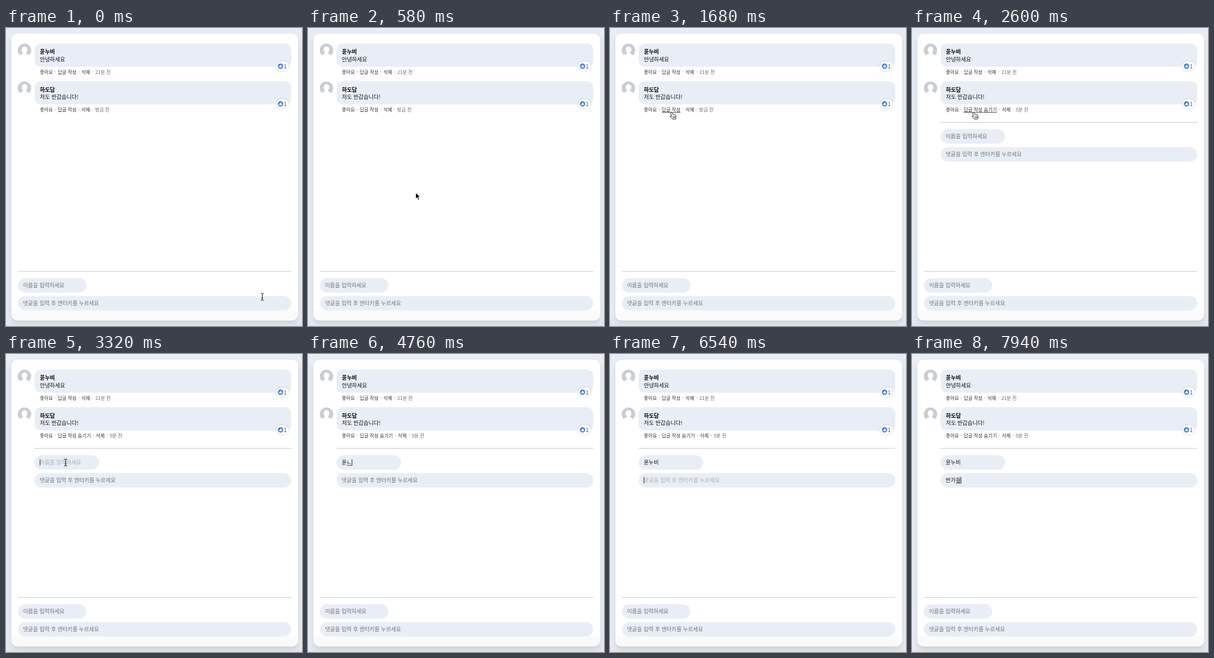
These frames come from a looping animation (496x500 px, 8000 ms). An HTML page:

```html
<!DOCTYPE html>
<html lang="ko">
<head>
<meta charset="utf-8">
<style>
html, body { margin: 0; width: 100%; height: 100%; overflow: hidden; background: #e9eef6; }
svg { display: block; }
text { font: 9.1px "Noto Sans CJK KR", "Noto Sans CJK", sans-serif; fill: #111; }
.name { font-size: 9.2px; font-weight: 700; fill: #000; }
.body { font-size: 9.2px; }
.link { font-size: 7.95px; font-weight: 500; fill: #333; }
.time { font-size: 7.95px; fill: #666; }
.hint { fill: #707378; }
.hint.focus { fill: #a9adb2; }
.count { font-size: 9.5px; fill: #50545a; }
.card { filter: drop-shadow(0 4px 5px rgba(0,0,0,.13)); }
.badge { filter: drop-shadow(0 .5px 1px rgba(0,0,0,.25)); }
.box { fill: #e9eef6; }
.rule { fill: #c9cacc; }
</style>
</head>
<body>
<svg id="stage" width="496" height="500" viewBox="0 0 496 500"></svg>
<script>
const rect = (cls, x, y, w, h, r = 0) => `<rect class="${cls}" x="${x}" y="${y}" width="${w}" height="${h}" rx="${r}"/>`;
const label = (cls, x, y, s, id = '') => `<text class="${cls}" x="${x}" y="${y}" ${id && `id="${id}"`}>${s}</text>`;
const NAME_HINT = '이름을 입력하세요', TEXT_HINT = '댓글을 입력 후 엔터키를 누르세요';

const avatar = y => `<g transform="translate(31 ${y})" clip-path="url(#disc)">
  <circle r="11.4" fill="#c9cdd2"/>
  <path fill="#fff" d="M0-6.5C3.4-6.5 4.9-4 4.7-1C4.5 1.2 3.6 2.6 2.6 3.5V5.3C5 6.5 8 7 8.5 12H-8.5C-8 7-5 6.5-2.6 5.3V3.5C-3.6 2.6-4.5 1.2-4.7-1C-4.9-4-3.4-6.5 0-6.5Z"/></g>`;

const comment = (y, name, body, links) => avatar(y + 11.5) +
  rect('box', 48, y, 430, 39, 10) +
  label('name', 56.7, y + 17.3, name) + label('body', 56.7, y + 29.7, body) +
  `<rect class="badge" x="453" y="${y + 30}" width="21" height="16" rx="8" fill="#fff"/>
   <g transform="translate(460 ${y + 38})"><circle r="4.5" fill="#3f7de0"/>
   <path fill="#fff" d="M-2.5-.4H-1.3V2.2H-2.5ZM-.9-.5L.2-2.7Q1.3-2.6.9-.8H2.5L2.1 2.2H-.9Z"/></g>` +
  label('count', 465.2, y + 41.5, '1') + links;

const links = (y, reply, del, when, time, id = '') =>
  label('link', 56.7, y, '좋아요') + label('time', 81.4, y, '·') +
  label('link', 86.7, y, reply, id) + label('time', del - 5.4, y, '·') +
  label('link', del, y, '삭제') + label('time', when - 5.4, y, '·') +
  label('time', when, y, time);

const form = (x, y, nameWidth, nameId, textId) =>
  rect('rule', x, y - 12, 478 - x, 1) +
  rect('box', x, y, nameWidth, 24.3, 12.1) + rect('box', x, y + 30, 478 - x, 24.3, 12.1) +
  label('hint', x + 8.5, y + 15.6, NAME_HINT, nameId) +
  label('hint', x + 8.5, y + 45.4, TEXT_HINT, textId);

stage.innerHTML = `<defs>
  <clipPath id="disc"><circle r="11.4"/></clipPath>
  <linearGradient id="foot" x2="0" y2="1"><stop stop-color="#e9eef6"/><stop offset="1" stop-color="#e2e6ec"/></linearGradient></defs>
  <rect y="484" width="496" height="16" fill="url(#foot)"/>
  <rect class="card" x="9" y="9.5" width="480.5" height="481" rx="10" fill="#fff"/>
  <path fill="#fafafa" d="M9 474H489.5V480.5A10 10 0 0 1 479.5 490.5H19A10 10 0 0 1 9 480.5Z"/>` +
  comment(26, '윤누비', '안녕하세요', links(77.1, '답글 작성', 126.5, 149.7, '21분 전')) +
  comment(89.3, '하도담', '저도 반갑습니다!', '') +
  `<g id="closed">${links(140.2, '답글 작성', 126.5, 149.2, '방금 전', 'reply')}</g>
   <g id="opened">${links(140.2, '답글 작성 숨기기', 150.7, 173.7, '5분 전', 'hide')}
   ${form(48, 169.8, 108, 'nameField', 'textField')}</g>` +
  form(20, 419.8, 114.5) +
  `<path id="under" stroke="#111" stroke-width=".8"/>
   <path id="caret" stroke="#111" stroke-width=".9"/>
   <path id="mouse" stroke-linejoin="round"/>`;

const shapes = {
  arrow: ['M0 0V10.2L2.4 8 4.2 12 5.9 11.2 4.2 7.4H7.3Z', '#000', '#fff', .7],
  hand: ['M-2.4.5Q-1.2-1-.2.8L1.2 4 2.4 3.6 3.6 4.2 4.8 4.1 5.6 5 6 6.4 6.4 9 5.6 11.7H.6L-2.9 8Q-4.2 6.4-2.8 6.3L-1.2 7.2-2.5 2.5ZM1.5 7V9.6M3.1 7V9.6M4.6 7V9.6', '#fff', '#111', .85],
  beam: ['M-2.6-5.8Q0-5.8 0-4.5Q0-5.8 2.6-5.8M0-4.5V4.5M-2.6 5.8Q0 5.8 0 4.5Q0 5.8 2.6 5.8M-1.2 2.2H1.2', 'none', '#111', 1]
};

// time, x, y of the pointer
const route = [[80, 429.5, 451], [340, 181, 277], [570, 181, 277], [860, 76, 130],
  [1000, 90, 147], [1380, 95, 145], [1520, 104.3, 141.2], [2820, 104.3, 141.2], [3320, 100, 182]];
const nameKeys = [[3760, 'ㅇ'], [4380, '유'], [4520, '윤'], [4760, '윤ㄴ'], [4880, '윤누'], [5000, '윤눕'], [5100, '윤누비']];
const textKeys = [[6840, 'ㅂ'], [6980, '바'], [7080, '반'], [7260, '반ㄱ'], [7380, '반가'], [7480, '반강'],
  [7600, '반가우'], [7800, '반가워'], [7940, '반가웡']];

const typed = (keys, t) => keys.reduce((s, k) => t >= k[0] ? k[1] : s, '');

function pointer(t) {
  const i = route.findIndex(p => p[0] > t);
  if (i < 0) return route.at(-1).slice(1);
  if (!i) return route[0].slice(1);
  const a = route[i - 1], b = route[i];
  let u = (t - a[0]) / (b[0] - a[0]);
  u = u * u * (3 - 2 * u);
  return [a[1] + (b[1] - a[1]) * u, a[2] + (b[2] - a[2]) * u];
}

function fill(field, value, hint, focus) {
  field.textContent = value || hint;
  field.setAttribute('class', value ? '' : focus ? 'hint focus' : 'hint');
}

const show = (el, on) => el.style.display = on ? '' : 'none';

function draw(t) {
  const open = t >= 2600, inName = t >= 3320 && t < 5340, inText = t >= 5340;
  show(closed, !open);
  show(opened, open);

  const name = typed(nameKeys, t), text = typed(textKeys, t);
  fill(nameField, name, NAME_HINT, inName);
  fill(textField, text, TEXT_HINT, inText);
  const value = inText ? text : name, y = inText ? 211.8 : 182, step = 8.37;
  const end = 56.8 + value.length * step;
  show(under, (inName || inText) && value);
  under.setAttribute('d', `M${end - step + .3} ${y + 4.8}H${end - .3}`);
  show(caret, inName || inText && !(t >= 5940 && t < 6540));
  caret.setAttribute('d', `M${end + .2} ${y - 5.3}V${y + 5.3}`);

  const [px, py] = pointer(t);
  const over = t > 1380 && py < 143.5;
  reply.style.textDecoration = hide.style.textDecoration = over ? 'underline' : 'none';
  const kind = over ? 'hand' : py > 449.5 || open && py > 169.8 && py < 194 ? 'beam' : 'arrow';
  const [d, inside, line, width] = shapes[kind];
  const look = { d, fill: inside, stroke: line, 'stroke-width': width, transform: `translate(${px} ${py})` };
  for (const k in look) mouse.setAttribute(k, look[k]);
  show(mouse, t < 3780);
}

const [closed, opened, reply, hide, nameField, textField, under, caret, mouse] =
  ['closed', 'opened', 'reply', 'hide', 'nameField', 'textField', 'under', 'caret', 'mouse']
    .map(id => document.getElementById(id));
const start = performance.now();
function tick() {
  draw((performance.now() - start) % 8000);
  requestAnimationFrame(tick);
}
tick();
</script>
</body>
</html>
```
